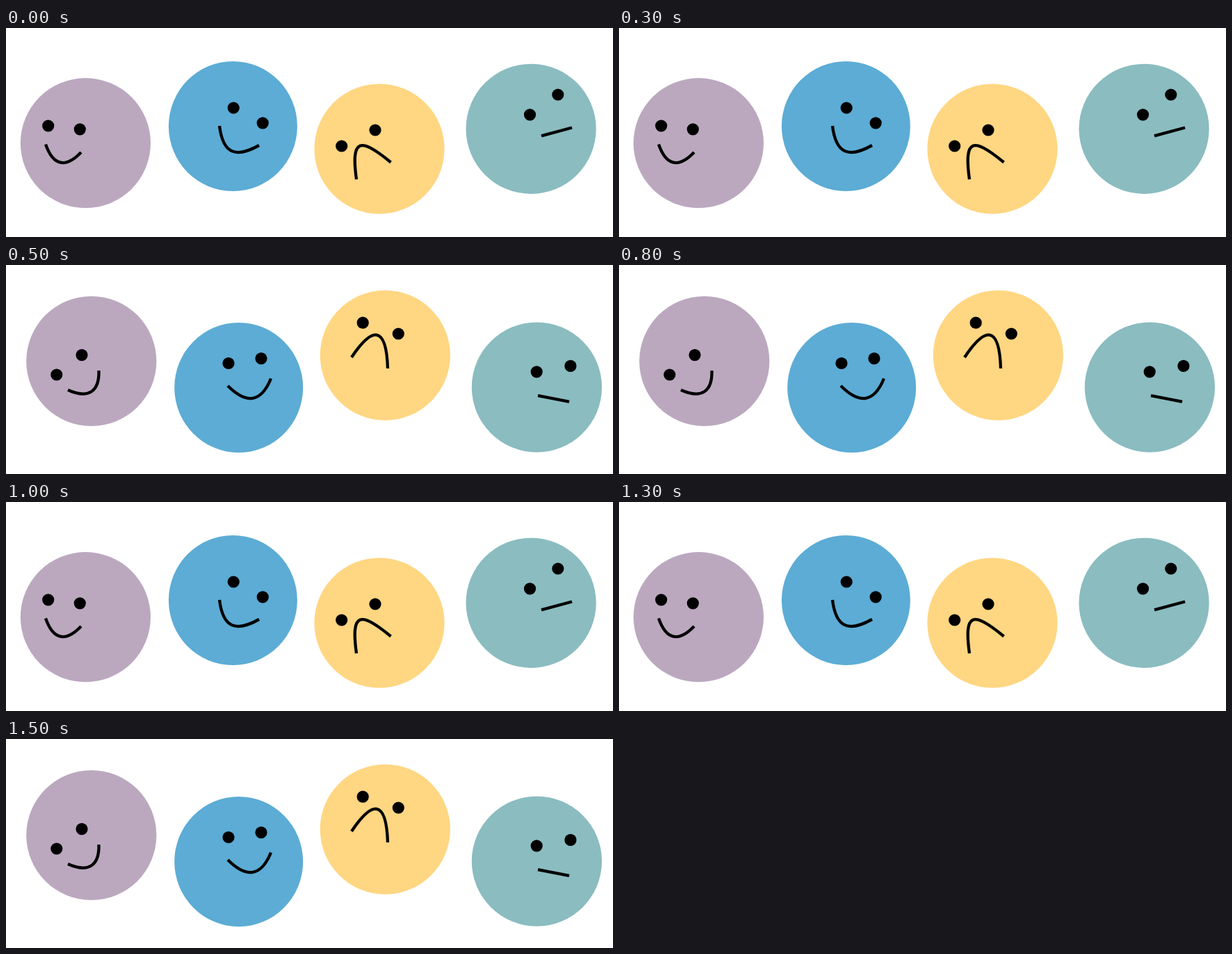
These frames come from a looping animation (873x301 px, 2 s). An HTML page:

```html
<!DOCTYPE html>
<html lang="en">
<head>
<meta charset="utf-8">
<title>Wobbling faces</title>
<style>
  html, body { margin: 0; width: 100%; height: 100%; overflow: hidden; background: #fff; }
  svg { display: block; width: 873px; height: 301px; }
  .pose { animation: swap 1s step-end infinite; }
  .second { animation-delay: -.5s; }
  .mouth { fill: none; stroke: #000; stroke-width: 4.3; }
  .lilac { fill: #bba8bf; }
  .blue { fill: #5cacd5; }
  .yellow { fill: #ffd682; }
  .teal { fill: #8abcc0; }
  @keyframes swap {
    0% { visibility: visible; }
    50%, 100% { visibility: hidden; }
  }
</style>
</head>
<body>
<svg viewBox="0 0 873 301">
  <defs>
    <circle id="head" r="93.6"/>
    <ellipse id="slim" rx="92.5" ry="93.6"/>
    <circle id="eye" r="8.6"/>
  </defs>

  <g class="pose">
    <use href="#head" class="lilac" x="114.4" y="165.7"/>
    <use href="#eye" x="60.7" y="140.8"/>
    <use href="#eye" x="106.3" y="145.8"/>
    <path class="mouth" d="M57 167.5C68 199 86 202 108 179"/>

    <use href="#slim" class="blue" x="326.4" y="141.5"/>
    <use href="#eye" x="327.2" y="115"/>
    <use href="#eye" x="369.2" y="136.8"/>
    <path class="mouth" d="M307 141C312 181 330 188 364 169"/>

    <use href="#head" class="yellow" x="537" y="174.1"/>
    <use href="#eye" x="482.7" y="170"/>
    <use href="#eye" x="531" y="147"/>
    <path class="mouth" d="M504 218C496 160 508 156 553.5 193.5"/>

    <use href="#head" class="teal" x="755.1" y="145.3"/>
    <use href="#eye" x="753.5" y="124.8"/>
    <use href="#eye" x="793.8" y="96"/>
    <path class="mouth" d="M770 155.3L814 143.5"/>
  </g>

  <g class="pose second">
    <use href="#head" class="lilac" x="122.8" y="138.5"/>
    <use href="#eye" x="72.8" y="158"/>
    <use href="#eye" x="109" y="129.6"/>
    <path class="mouth" d="M89 180C118 193 134.5 183 133.5 152"/>

    <use href="#slim" class="blue" x="334.7" y="176.6"/>
    <use href="#eye" x="320" y="141.5"/>
    <use href="#eye" x="367" y="134.6"/>
    <path class="mouth" d="M319 174C346 201 367 198 381 163.5"/>

    <use href="#head" class="yellow" x="545.3" y="130.1"/>
    <use href="#eye" x="513.2" y="83.2"/>
    <use href="#eye" x="564.3" y="99"/>
    <path class="mouth" d="M497 133C527 88 547 87 549 149"/>

    <use href="#head" class="teal" x="763.4" y="176.1"/>
    <use href="#eye" x="763.2" y="153.8"/>
    <use href="#eye" x="811.9" y="145.4"/>
    <path class="mouth" d="M765 188.2L810 196.8"/>
  </g>
</svg>
</body>
</html>
```
